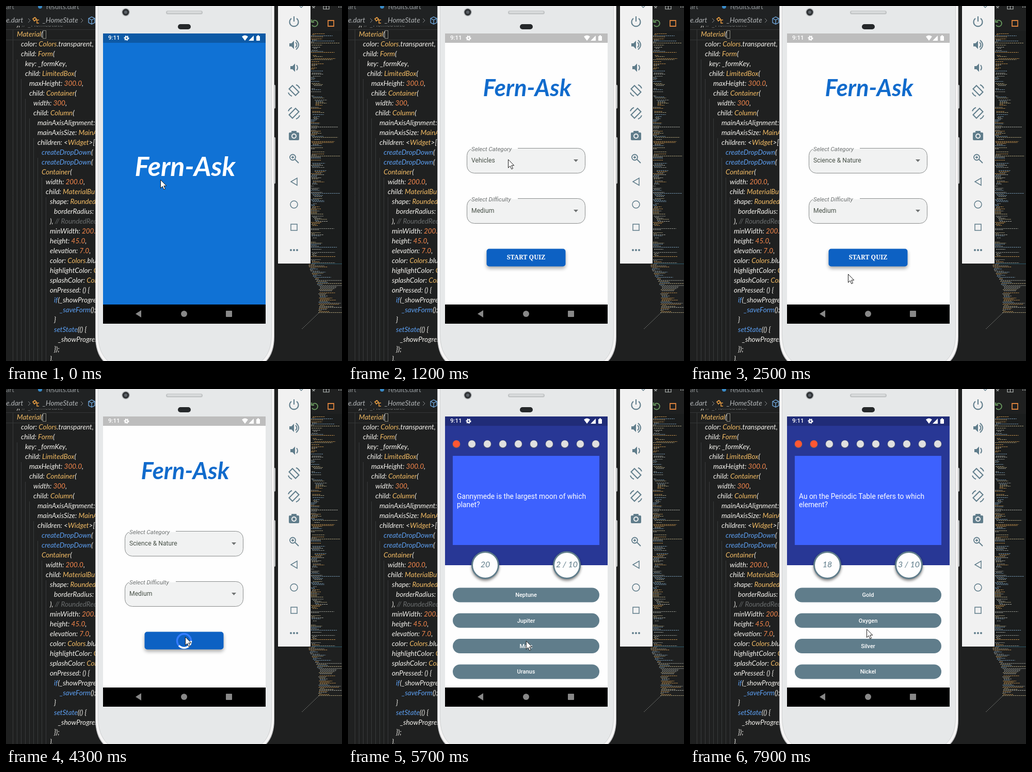
Recreate the animation shown at these times as an HTML page with a canvas. Size 651 by 685 pixels, loop 8000 ms.

```html
<!DOCTYPE html>
<html lang="en">
<head>
<meta charset="utf-8">
<title>Quiz app in an emulator</title>
<style>
html, body { margin: 0; width: 100%; height: 100%; overflow: hidden; background: #1f2020; }
canvas { display: block; }
</style>
</head>
<body>
<canvas id="stage" width="651" height="685"></canvas>
<script>
const g = document.getElementById('stage').getContext('2d');
const TAU = Math.PI * 2, SLATE = '#607d8b', APP = 'Fern-Ask';
const SANS = 'Roboto, sans-serif', HAND = 'Lato, sans-serif', CODE = 'italic 13.5px ' + HAND;

const clamp = v => Math.max(0, Math.min(1, v));
const ease = v => { v = clamp(v); return v * v * (3 - 2 * v); };
const mix = (a, b, p) => a + (b - a) * p;

function rect(x, y, w, h, fill, r = 0) {
  g.beginPath(); g.roundRect(x, y, w, h, r); g.fillStyle = fill; g.fill();
}
function disc(x, y, r, fill) {
  g.beginPath(); g.arc(x, y, r, 0, TAU); g.fillStyle = fill; g.fill();
}
function path(d, fill, stroke, width = 1) {
  const p = new Path2D(d);
  if (fill) { g.fillStyle = fill; g.fill(p); }
  if (stroke) { g.strokeStyle = stroke; g.lineWidth = width; g.stroke(p); }
}
function text(s, x, y, font, fill, align = 'left') {
  g.font = font; g.fillStyle = fill; g.textAlign = align; g.textBaseline = 'middle';
  g.fillText(s, x, y);
}
function shadow(color, blur, dy) { g.shadowColor = color; g.shadowBlur = blur; g.shadowOffsetY = dy; }
function layer(alpha, draw, dy = 0) {
  if (alpha <= 0) return;
  g.save(); g.globalAlpha = alpha; g.translate(0, dy); draw(); g.restore();
}
function clip(x, y, w, h) { g.beginPath(); g.rect(x, y, w, h); g.clip(); }

// Editor: indent depth, then source
const code = [
  [0, '), // _HomeState'], [0, 'Material('], [1, 'color: Colors.transparent,'], [1, 'child: Form('],
  [2, 'key: _formKey,'], [2, 'child: LimitedBox('], [3, 'maxHeight: 300.0,'], [3, 'child: Container('],
  [4, 'width: 300,'], [4, 'child: Column('], [5, 'mainAxisAlignment:'], [5, 'mainAxisSize: MainAxis'],
  [5, 'children: <Widget>['], [6, 'createDropDown('], [6, 'createDropDown('], [6, 'Container('],
  [7, 'width: 200.0,'], [7, 'child: MaterialButton('], [8, 'shape: RoundedRect'], [9, 'borderRadius:'],
  [8, '), // RoundedRect'], [8, 'minWidth: 200.0,'], [8, 'height: 45.0,'], [8, 'elevation: 7.0,'],
  [8, 'color: Colors.blue,'], [8, 'highlightColor: C'], [8, 'splashColor: Colors'], [8, 'onPressed: () {'],
  [9, 'if(_showProgress'], [10.4, '_saveForm();'], [9, '}'], [9, 'setState(() {'], [10, '_showProgress'],
  [9, '});'], [8, '},']
];
const token = /\/\/.*|createDropDown|_saveForm|setState|if|[A-Z]\w*|\d[\d.]*|[a-z_]\w*|./g;
function tint(s) {
  if (s.startsWith('//')) return '#6a6d6e';
  if (/^(create|_save|setS|if)/.test(s)) return '#5c9ff2';
  if (/^[A-Z]/.test(s)) return '#f2bb64';
  if (/^\d/.test(s)) return '#f5874c';
  return '#f5f3ee';
}
function drawCode() {
  g.strokeStyle = '#393b3c'; g.lineWidth = 1;
  for (let i = 0; i < 9; i++) {
    g.beginPath(); g.moveTo(13.5 + i * 8, i ? 65 + i * 38 : 46); g.lineTo(13.5 + i * 8, 685); g.stroke();
  }
  rect(0, 45, 175, 1, '#343637'); rect(0, 65, 175, 1, '#343637');
  g.strokeStyle = '#8c8c83'; g.strokeRect(71.5, 47.5, 6, 15);
  code.forEach(([depth, line], i) => {
    let x = 21 + depth * 8;
    for (const s of line.match(token)) {
      text(s, x, 36 + i * 19, CODE, tint(s));
      x += g.measureText(s).width;
    }
  });
  rect(0, 0, 175, 38, '#202223');
  text('art', 0, 2, '13px ' + HAND, '#85898b');
  disc(66, 1, 4, '#398ac6');
  text('results.dart', 78, 2, '13px ' + HAND, '#989da0');
  text('ne.dart', -7, 28, CODE, '#b0b3b5');
  path('M43 24l4 4-4 4M145 24l4 4-4 4', null, '#898c8e');
  path('M52 25l4-3 3 3-4 4zM57 27h7M60 27v6h4', null, '#e69c42', 1.6);
  text('_HomeState', 71, 28, CODE, '#b0b3b5');
  path('M160 24l6-3 6 3v8l-6 3-6-3zM160 24l6 3 6-3M166 27v8', null, '#75aee5', 1.3);
}

function drawMinimap() {
  let seed = 17;
  const rnd = () => (seed = (seed * 16807) % 2147483647) / 2147483647;
  const inks = ['#a3a49c', '#a79a75', '#b98a4a', '#6f8fa8', '#8d8f88'];
  rect(590, 48, 61, 450, '#1b1d1d');
  rect(586, 497, 65, 1, '#285769');
  let depth = 0;
  for (let y = 49; y < 592; y += 2) {
    const low = y > 498;
    depth = rnd() < .17 ? 0 : Math.min(5, depth + rnd() * 2.2 - .8);
    if (rnd() < (low ? .04 : .27)) continue;
    const x = low ? 583 + Math.min(22, (y - 498) * .5) + rnd() * 4 : 591 + Math.max(0, depth) * 1.8;
    const w = rnd() < .14 ? 40 + rnd() * 18 : 5 + rnd() * (low ? 32 : 20);
    g.fillStyle = inks[Math.floor(rnd() * inks.length)];
    for (let dx = 0; dx < w; dx += 4) g.fillRect(x + dx, y, Math.min(3, w - dx), 1);
  }
  for (let i = 0; i < 16; i++) rect(605 - i * 2.1, 592 + i * 2, 1.3, 1, '#898b86');
  path('M593 0l5 4M599 0l-5 4M615 0h11v6h-11zM620.5 0v6', null, '#b8bcba', 1.2);
  for (const x of [645, 649]) disc(x, 2, 1, '#b8bcba');
  path('M594 29a6 6 0 1 1-1 8M592 26v5h5', null, '#6d9e62', 1.8);
  path('M624 28h11v11h-11z', null, '#d9823e', 1.8);
}

function drawToolbar() {
  rect(526, 0, 65, 498, '#151616');
  rect(527, 0, 63, 497, '#f1f1f1');
  path('M569 0l3 3 4-4', null, SLATE, 1.3);
  const S = [null, SLATE, 2];
  path('M553 24a8.5 8.5 0 1 0 10 0M558 20v10', ...S);
  for (const y of [75, 119]) path(`M${y < 99 ? 549 : 551} ${y - 3}h4l5-5v16l-5-5h-4z`, SLATE);
  path('M561 70q5 5 0 10M562 66q10 9 0 18M563 114q4 5 0 10', ...S);
  for (const [y, f] of [[163, 1], [207, -1]]) {
    g.save(); g.translate(558, y); g.scale(f, 1);
    path('M-9.5-3l6.500-6.500L9.500 3L3 9.500zM-11 4a12 12 0 0 0 7 7M4-11a12 12 0 0 1 7 7', ...S);
    g.restore();
  }
  rect(548, 244, 20, 15, SLATE, 2); rect(553, 241, 10, 5, SLATE, 1);
  disc(558, 251, 5, '#f1f1f1'); disc(558, 251, 3, SLATE);
  path('M561 292a5.5 5.5 0 1 1-11 0a5.5 5.5 0 1 1 11 0M560 296l7 7M553 292h5M555.500 289.500v5', null, SLATE, 1.8);
  path('M564 332v14l-12-7zM565 383a7 7 0 1 1-14 0a7 7 0 1 1 14 0M552 421h12v12h-12z', null, SLATE, 1.5);
  for (const x of [552, 558, 564]) disc(x, 471, 2, SLATE);
}

function drawPhone() {
  rect(518, 152, 4, 46, '#c9cccd', 2); rect(518, 253, 4, 90, '#c9cccd', 2);
  path('M173 0V638Q173 669 188 685H505Q520 669 520 638V0z', '#b9b9bb');
  path('M174 0V637Q174 668 190 685H503Q519 668 519 637V0z', '#f6f5f5');
  path('M178 0V634Q178 668 197 685H496Q515 668 515 634V0z', '#cfd1d2');
  path('M179 0V633Q179 668 198 685H495Q514 668 514 633V0z', '#e6e8e9');
  disc(232, 12, 8, '#bbbec0'); disc(232, 12, 6.5, '#303336'); disc(232, 12, 3, '#5c6268');
  rect(310, 9, 71, 7, '#c0c3c4', 4); rect(312, 10, 67, 4, '#d8dadb', 2);
  rect(333, 35, 25, 10, '#25282a', 5);
}

function drawStatus(fill) {
  rect(188, 53, 315, 18, fill);
  text('9:11', 198, 62, '500 11.5px ' + SANS, '#fff');
  g.setLineDash([2.2, 1.7]);
  path('M237.500 62a4 4 0 1 1-8 0a4 4 0 1 1 8 0', null, '#fff', 2);
  g.setLineDash([]);
  path('M236 62a2.500 2.500 0 1 1-5 0a2.500 2.500 0 1 1 5 0', null, '#fff', 2);
  path('M457 59q6-5 12 0l-6 8zM480 57v10h-10z', '#fff');
  rect(485, 58, 7, 9, '#fff', 1); rect(487, 56.5, 3, 2, '#fff');
}

function drawNav() {
  rect(188, 576, 315, 37, '#000');
  path('M251 594l11-7v14z', '#888');
  disc(345, 594, 6, '#888');
  rect(426, 588, 12, 12, '#888', 1);
}

function drawField(y, label, value) {
  rect(230, y, 229, 48, '#f1f2f2', 14);
  g.beginPath(); g.roundRect(230.5, y + .5, 229, 48, 14);
  g.strokeStyle = '#888b8b'; g.lineWidth = 1; g.stroke();
  rect(237, y - 1, 92, 3, '#fefefe');
  text(label, 239, y + 3, 'italic 11.5px ' + SANS, '#707474');
  text(value, 239, y + 24, '12.2px ' + SANS, '#475047');
  path(`M437 ${y + 22}h9l-4.500 5z`, '#707373');
}

const topics = ['General Knowledge', 'Books', 'Film', 'Music', 'Musicals & Theatres', 'Television',
  'Video Games', 'Board Games', 'Science & Nature', 'Computers', 'Mathematics', 'Mythology',
  'Sports', 'Geography', 'History', 'Politics', 'Art', 'Animals', 'Vehicles', 'Comics',
  'Gadgets', 'Cartoon & Animations'];

function drawMenu(t) {
  const open = ease((t - 1200) / 300), shown = open * (1 - clamp((t - 2100) / 300));
  const top = mix(279, 127, open), height = mix(38, 421, open);
  const scroll = 517 * ease((t - 1400) / 300);
  layer(shown, () => {
    shadow('#0005', 9, 3);
    rect(224, top, 248, height, '#fcfcfc', 2);
    shadow('transparent', 0, 0);
    clip(224, top, 248, height);
    if (t >= 1900) rect(224, 427, 248, 37, '#e5e5e5');
    topics.forEach((s, i) => text(s, 239, 298 + (i - 18) * 37 + scroll, '12.2px ' + SANS, '#333'));
  });
}

function drawHome(t) {
  rect(188, 53, 315, 523, '#fefefe');
  drawStatus('#bdbdbd');
  drawField(274, 'Select Category', t < 2100 ? 'Vehicles' : 'Science & Nature');
  drawField(371, 'Select Difficulty', 'Medium');
  shadow('#0005', 7, 4);
  rect(268.5, 468.5, 153, 34, '#0d61c3', 5);
  shadow('transparent', 0, 0);
  if (t < 3500) text('START QUIZ', 345, 485.5, 'bold 12.2px "Noto Serif", serif', '#fff', 'center');
  if (t >= 3300 && t < 3700) layer(.3 * (1 - (t - 3300) / 400), () => {
    clip(268, 468, 154, 34);
    disc(347, 480, 25 + (t - 3300) / 5, '#83b4ff');
  });
  if (t >= 3500) {
    const a = (t - 4300) / 1000 * TAU * 1.2;
    g.lineWidth = 3.5;
    for (const [from, to, ink] of [[0, TAU, '#347dff'], [a, a + 2.4, '#fff']]) {
      g.beginPath(); g.arc(345, 486, 13.5, from, to); g.strokeStyle = ink; g.stroke();
    }
  }
}

function drawTitle(p) {
  const ink = `rgb(${mix(255, 17, p)},${mix(255, 107, p)},${mix(255, 204, p)})`;
  text(APP, 347, mix(312, 160, p), `italic 700 ${mix(52, 45.5, p)}px ${HAND}`, ink, 'center');
}

const rounds = [
  { at: 0, tick: 4500, picked: 5200, lines: ['What is the colour of unoxidized blood?'],
    answers: ['Green', 'Red', 'Purple', 'Blue'] },
  { at: 5500, tick: 5700, picked: 7300, lines: ['Gannymede is the largest moon of which', 'planet?'],
    answers: ['Neptune', 'Jupiter', 'Mars', 'Uranus'] },
  { at: 7500, tick: 7300, picked: 9000, lines: ['Au on the Periodic Table refers to which', 'element?'],
    answers: ['Gold', 'Oxygen', 'Silver', 'Nickel'] }
];

function badge(x, label) {
  shadow('#0007', 5, 3);
  disc(x, 340, 27, SLATE);
  shadow('transparent', 0, 0);
  disc(x, 340, 24, '#fefefe');
  text(label, x, 339, 'italic 16px ' + HAND, SLATE, 'center');
}

function drawQuiz(t) {
  const n = rounds.findLastIndex(r => t >= r.at), round = rounds[n];
  const wrong = rounds.filter(r => t >= r.picked).length;
  const left = 20 - Math.max(0, Math.floor((Math.min(t, round.picked - 200) - round.tick) / 300));
  rect(188, 53, 315, 523, '#fefefe');
  rect(188, 71, 315, 269, '#283795');
  drawStatus('#202c78');
  for (let i = 0; i < 10; i++) {
    disc(210 + i * 30, 106.5, 8, '#444d78');
    disc(210 + i * 30, 106, 7, i < wrong ? '#ff5733' : '#e0e0e0');
  }
  rect(203, 129, 284, 172, '#3d61fe');
  round.lines.forEach((s, i) => round.lines.length > 1
    ? text(s, 211, 208 + i * 16, '13.8px ' + SANS, '#fff')
    : text(s, 345, 216, '13.8px ' + SANS, '#fff', 'center'));
  badge(266, left);
  badge(424, `${n + 1} / 10`);
  round.answers.forEach((s, i) => {
    const y = 397.5 + i * 49.3;
    rect(203, y - 14, 284, 28, i == 2 && t >= round.picked ? '#ff5733' : SLATE, 14);
    text(s, 345, y + .5, '500 11px ' + SANS, '#fff', 'center');
  });
}

// Pointer stops: time, x, y
const stops = [[0, 299, 335], [300, 299, 335], [1100, 310, 295], [1800, 310, 300], [1900, 233, 433],
  [2100, 233, 433], [2500, 306, 517], [2700, 306, 517], [2800, 343, 462], [3000, 343, 462],
  [3100, 347, 478], [5000, 347, 478], [5100, 347, 488], [5900, 344, 485], [6600, 340, 473],
  [6800, 340, 473], [7100, 347, 494], [7700, 347, 494], [7900, 342, 463], [8000, 342, 463]];

function drawPointer(t) {
  const i = stops.findIndex(s => s[0] > t), [t0, x0, y0] = stops[i - 1], [t1, x1, y1] = stops[i];
  const p = (t - t0) / (t1 - t0);
  g.save();
  g.translate(mix(x0, x1, p), mix(y0, y1, p));
  path('M.5.5v16l3.700-3.500 2.700 6 2.600-1.200-2.700-5.800h5z', '#fff', '#1b1b1b');
  g.restore();
}

function drawScreen(t) {
  const arrive = ease((t - 300) / 800), quiz = ease((t - 4300) / 450);
  g.save();
  clip(188, 53, 315, 523);
  if (quiz < 1) {
    drawHome(t);
    layer(1 - arrive, () => { rect(188, 53, 315, 523, '#1072d5'); drawStatus('#0d59a5'); });
    drawTitle(arrive);
    drawMenu(t);
  }
  layer(quiz, () => drawQuiz(t), 60 * (1 - quiz));
  g.restore();
  drawNav();
}

function frame(now) {
  const t = Math.floor(now % 8000 / 100) * 100;
  rect(0, 0, 651, 685, '#1f2020');
  drawCode();
  drawMinimap();
  drawToolbar();
  drawPhone();
  drawScreen(t);
  drawPointer(t);
  requestAnimationFrame(frame);
}
requestAnimationFrame(frame);
</script>
</body>
</html>
```
